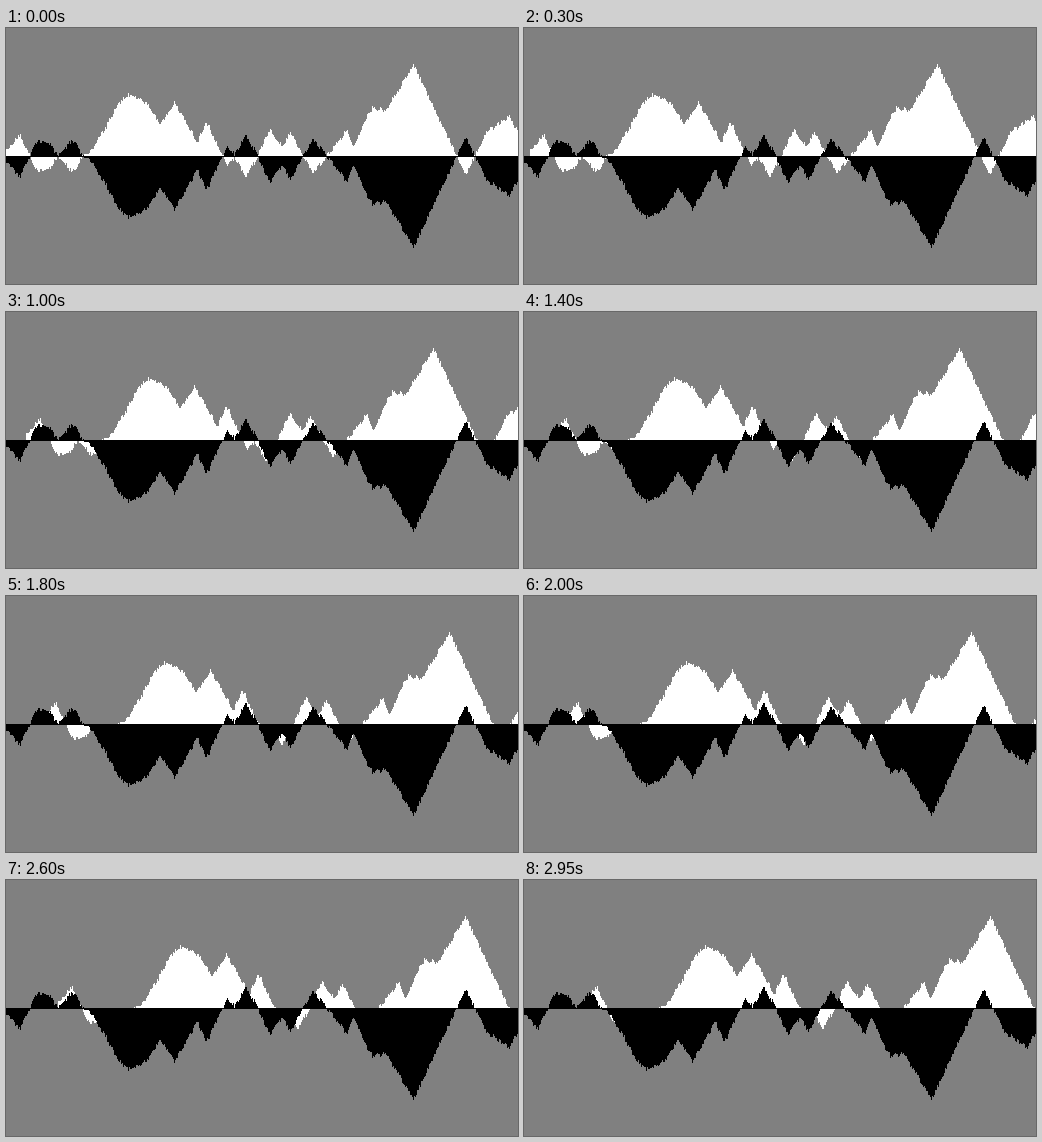
Write a matplotlib script that moves like this. It is 512 px wide and 256 px high and loops after 3 s.

```python
import numpy as np
import matplotlib.pyplot as plt
from matplotlib.animation import FuncAnimation

W, H, MID = 512, 256, 128
FRAMES, STEP_MS = 60, 50

# Main summits and valleys (x, height); the finer detail is seeded noise.
KEYS = [(0, 7), (14, 22), (31, -14), (42, -13), (52, 0), (66, -15), (78, 2),
        (86, 7), (113, 54), (122, 63), (142, 52), (154, 32), (168, 55),
        (191, 14), (200, 33), (222, -8), (228, 0), (239, -21), (264, 27),
        (275, 10), (284, 24), (306, -17), (341, 26), (347, 10), (366, 50),
        (379, 45), (407, 92), (459, -17), (480, 25), (503, 41), (511, 26)]


def make_ridge(seed=7):
    """Straight slopes between the keys, roughened column by column."""
    rng = np.random.default_rng(seed)
    kx, ky = np.transpose(KEYS)
    x = np.arange(W)
    drift = np.convolve(rng.normal(0, 2, W), np.ones(5) / 5, mode="same")
    teeth = rng.choice([-2, -1, 1], W)
    ridge = np.round(np.interp(x, kx, ky) + drift + teeth)
    ridge[kx] = ky
    return np.clip(ridge, ky.min(), ky.max())


ridge = make_ridge()

fig = plt.figure(figsize=(W / 100, H / 100), dpi=100, facecolor="#808080")
ax = fig.add_axes([0, 0, 1, 1])
ax.set_xlim(0, W)
ax.set_ylim(H, 0)
ax.axis("off")


def silhouette(values, color):
    return ax.stairs(values, np.arange(W + 1), baseline=MID, fill=True,
                     color=color, linewidth=0, antialiased=False)


white = silhouette(MID - ridge, "white")
black = silhouette(MID + ridge, "black")
ax.fill_between([0, W], MID, MID + 1, color="black", linewidth=0,
                antialiased=False, zorder=3)


def update(i):
    moved = np.zeros(W)
    moved[i:] = ridge[:W - i]
    white.set_data(MID - moved)
    return white, black


anim = FuncAnimation(fig, update, frames=FRAMES, interval=STEP_MS,
                     repeat=True, repeat_delay=0)
plt.show()
```
